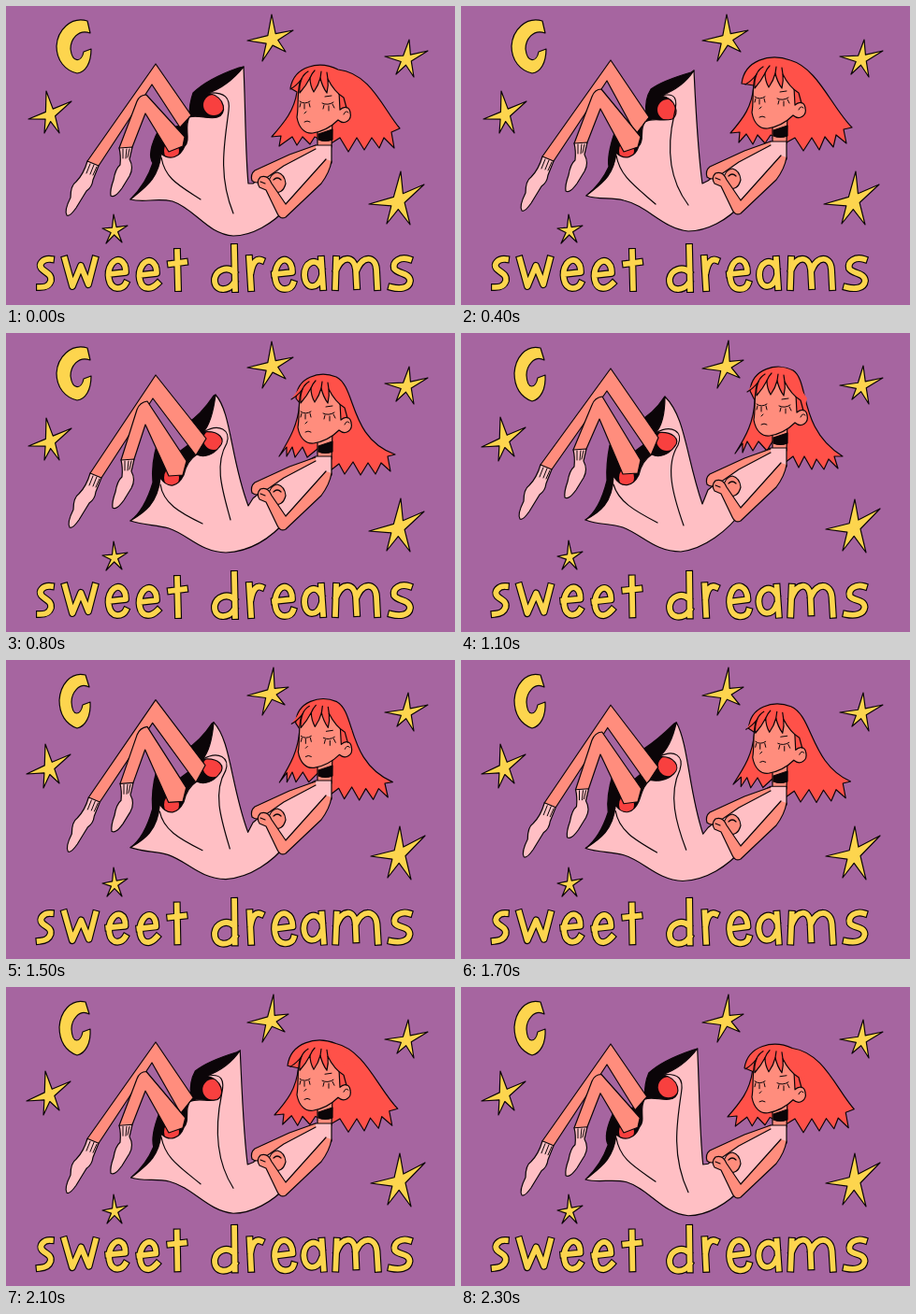
These frames come from a looping animation (480 px wide and 320 px high, 2.4 s). An HTML page with a canvas:

```html
<!DOCTYPE html>
<html lang="en">
<head>
<meta charset="utf-8">
<title>sweet dreams</title>
<style>
html, body { margin: 0; width: 100%; height: 100%; overflow: hidden; background: #a665a0; }
canvas { display: block; width: 480px; height: 320px; }
</style>
</head>
<body>
<canvas id="c" width="480" height="320" role="img" aria-label="sweet dreams"></canvas>
<script>
const ctx = document.getElementById('c').getContext('2d');
const INK = '#0b0508', BG = '#a665a0', YELLOW = '#fdd54e', SKIN = '#ff8d7d',
      HAIR = '#ff5149', PINK = '#ffbfc4', RED = '#f8403f';

// Pose keys, counted in steps of 100 ms from the lowest pose to the highest
const KEYS = [0, 4, 8, 11];
const STEP = 100, COUNT = 24;

const BOB = ['0 0', '0 -4', '0 -16', '0 -25'];
const FOOT_BACK_AT = ['0 0', '0 -5', '3 -16', '-2 -25'];
const FOOT_FRONT_AT = ['0 0', '0 -5', '2 -16', '-1 -27'];
const FACE = ['0 0', '0 -5', '1 -18', '2 -26'];

const LINING = [
  'M249,66Q215,78 200,93Q196,104 196,118L186,128L163,133Q150,158 157,168Q150,190 133,207L175,185L235,120L238,95L254,65Z',
  'M246,71Q215,80 203,89Q196,100 198,116L186,130L164,136Q156,160 158,172Q150,190 134,203L175,185L232,122L235,95L249,69Z',
  'M222,67Q208,88 193,97Q196,106 200,116L184,128L162,117Q155,140 157,160Q148,190 133,201L175,185L230,120L226,100L224,66Z',
  'M217,69Q206,86 189,95Q195,106 200,116L184,128L159,120Q155,140 156,158Q148,190 133,200L175,185L230,120L222,100L218,68Z'
];
const DRESS = [
  'M254,65C256,110 256,160 259,190L264,190L294,168L331,149L348,149L348,168L302,214C285,234 262,246 243,246C215,244 202,217 178,209C160,205 148,211 133,207C150,193 163,185 166,158C175,166 186,162 191,150C198,143 190,130 196,119C205,116 218,122 226,119C236,116 236,98 216,93C232,88 245,76 254,65Z',
  'M249,69C251,110 253,155 258,190L264,187L294,164L331,145L348,145L348,164L302,210C285,230 262,241 243,241C215,238 200,214 174,208C160,204 148,208 134,203C150,190 163,183 166,157C175,166 186,162 190,150C197,143 190,132 197,124C205,119 216,124 226,121C234,116 230,99 214,96C230,90 242,80 249,69Z',
  'M224,66C241,85 240,135 259,185L264,177L294,152L331,132L348,132L348,152L302,198C285,218 262,234 235,235C207,234 195,216 174,209C160,205 148,206 133,201C148,192 162,183 165,155C174,168 184,164 190,152C192,143 196,135 204,130C212,134 222,130 228,122C236,114 228,104 211,106C218,98 222,82 224,66Z',
  'M218,68C240,90 240,130 258,183L264,168L294,143L331,123L348,123L348,143L302,189C285,212 260,231 235,234C207,234 194,216 173,208C158,203 148,206 133,200C148,192 162,183 163,153C172,168 184,164 190,152C192,143 196,135 204,130C212,134 222,130 228,122C236,114 226,104 208,107C216,98 218,82 218,68Z'
];
const FOLDS = [
  'M216,93C234,92 240,98 238,112C234,145 226,180 243,222M166,162C170,185 185,192 208,207',
  'M214,96C230,92 232,100 228,116C220,150 222,185 243,213M166,160C170,182 185,192 208,212',
  'M211,106C228,96 241,104 236,118C222,142 232,170 240,200M165,162C168,182 185,192 210,204',
  'M208,107C226,97 238,106 232,120C218,142 226,172 238,206M163,162C168,180 185,190 210,203'
];
const LEG_BACK = [
  'M87,166L160,62L198,117L186,130L156,84L99,171',
  'M87,161L160,58L201,119L187,137L156,80L99,166',
  'M90,150L160,45L214,113L203,131L157,70L102,155',
  'M85,141L160,38L211,112L203,131L156,62L97,146'
];
const LEG_FRONT = [
  'M121,152L140,102Q143,95 150,95L191,140L189,150L174,156L149,115L135,151',
  'M121,147L140,97Q143,89 150,89L192,140L189,151L174,156L149,110L135,146',
  'M123,136L140,82Q143,74 151,73L193,137L189,152L174,153L149,98L137,135',
  'M120,125L140,77Q143,69 151,68L192,136L189,150L173,151L148,92L134,124'
];
const KNEE_HOLES = ['222 106', '221 111', '222 114', '220 115'];

const MANE = [
  'M304,88C308,64 335,58 355,68C390,72 403,110 421,131L412,135L415,152L404,141L399,152L391,141L383,154L375,141L366,156L357,141L346,148L330,140L325,148L317,140L311,149L306,140L292,150L294,139L284,140C298,124 308,112 311,92Z',
  'M300,83C303,58 330,50 352,58C381,66 396,108 418,130L409,132L412,147L401,138L398,151L389,140L383,154L375,141L366,155L357,141L348,146L331,138L325,147L317,138L312,148L305,137L297,146L298,135L288,136C302,120 311,108 313,85Z',
  'M310,70C311,47 335,40 353,47C375,58 366,112 416,130L408,132L411,148L401,139L395,151L387,139L379,152L371,138L362,151L356,140L347,147L333,124L322,133L317,122L309,133L306,122L300,132L300,122L292,132C304,112 312,98 314,75Z',
  'M309,62C311,38 338,31 355,40C373,52 360,102 408,132L399,132L403,145L393,135L388,146L380,135L375,146L367,132L361,144L355,132L346,139L333,116L327,126L318,116L312,126L306,116L301,128L301,118L293,129C305,110 313,95 314,72Z'
];

const FOOT_BACK = 'M87,166L99,171L93,186Q92,194 86,198L75,216Q68,226 65,224Q62,219 69,205Q69,192 75,188Q83,180 87,166Z';
const FOOT_FRONT = 'M121,152L135,151L132,164Q137,173 132,182L124,195Q116,206 112,203Q111,197 115,186Q117,174 122,170Q123,160 121,152Z';
const CUFFS_BACK = 'M90,169L86,179M94,170L90,180M97,172L93,181';
const CUFFS_FRONT = 'M125,153L125,163M129,153L128,163M132,153L130,162';
const ARM_FAR = 'M331,149L303,159L266,176Q261,180 263,187Q268,191 274,187L297,171L331,153';
const FIST = 'M280,191Q282,179 290,178Q298,180 299,190Q296,202 285,199ZM286,186Q290,182 294,186';
const ARM_NEAR = 'M342,164L299,212L284,190Q280,180 272,183Q267,188 271,194L278,197L290,222Q293,229 299,226L337,190Q346,178 348,166M272,188L277,190';
const HEAD = 'M314,82C311,96 313,108 311,119C313,131 320,137 328,136C340,134 349,128 355,122C362,128 370,122 368,114C367,107 361,107 357,111L356,92L340,72L322,72Z';
const FRINGE = 'M304,89Q311,85 316,78Q313,86 314,93Q321,85 325,77Q325,85 329,92Q334,85 336,77Q338,86 343,93Q345,85 344,78Q351,92 361,98L364,109';
const STRANDS = 'M316,78Q318,73 323,70M325,77Q327,72 330,69M336,77L337,70M344,78L343,71';
const FEATURES = 'M314,102Q319,106 325,102M338,104Q344,107 350,103M315,104L314,108M319,105L319,110M324,104L325,108M340,106L339,110M345,107L345,112M349,105L351,109M341,97L348,96M321,113L319,115M319,124Q322,122 325,124M361,116Q363,111 366,114';

const MOONS = [
  'M87,16L90,29C77,24 69,36 69,46C71,62 81,60 83,49L91,46C91,61 85,71 76,72C63,69 54,58 54,43C55,26 69,11 87,16Z',
  'M85,16L89,29C78,23 70,36 70,45C71,62 80,59 82,48L90,45C91,60 85,71 76,73C64,69 57,58 57,43C58,27 69,12 85,16Z'
];
// Five tips each, clockwise from the top
const STARS = [
  ['284 9 307 26 299 49 274 59 258 37', '431 36 451 48 436 76 417 73 405 54',
   '43 91 70 102 57 136 41 136 24 121', '422 177 447 191 432 234 407 233 388 212',
   '115 223 130 235 124 253 107 254 103 238'],
  ['286 8 302 29 298 48 274 59 258 38', '430 35 451 48 436 76 418 71 405 56',
   '42 90 69 101 57 132 40 137 22 122', '421 178 448 188 433 235 408 233 390 210',
   '115 222 130 234 124 253 108 253 103 239']
];
const LETTERS = [
  'M48,271C40,270 34,276 38,281C43,286 49,287 48,294C46,301 40,301 36,301',
  'M63,271L71,300L80,278L88,298L95,271',
  'M110,287L128,285C128,272 119,268 113,276C107,285 109,301 119,302C124,302 127,299 128,297',
  'M143,288L161,286C161,273 152,269 146,277C140,286 142,302 152,302C157,302 160,299 162,297',
  'M183,263L184,302M176,276L191,274',
  'M244,258L245,303M244,285C237,278 225,282 223,292C222,306 238,306 244,296',
  'M260,270L262,302M262,284C264,274 268,270 273,272',
  'M287,287L306,285C306,271 296,268 291,276C285,286 287,303 298,303C303,303 306,300 307,297',
  'M337,271L339,301M337,280C331,268 319,275 319,288C320,304 333,303 337,291',
  'M352,301L353,271M353,282C359,267 372,267 374,282L375,300M375,282C381,267 395,267 396,282L397,301',
  'M431,271C422,268 413,273 415,281C419,287 431,285 432,294C431,303 420,303 412,301'
];

const NUM = /-?\d+(\.\d+)?/g;
const nums = s => s.match(NUM).map(Number);

function tween(keys, d) {
  let i = 0;
  while (i < KEYS.length - 2 && d > KEYS[i + 1]) i++;
  const f = Math.min(1, (d - KEYS[i]) / (KEYS[i + 1] - KEYS[i]));
  const to = nums(keys[i + 1]);
  let n = 0;
  return keys[i].replace(NUM, a => (+a + (to[n++] - a) * f).toFixed(2));
}

function wobble(path, seed) {
  let n = seed * 17;
  return path.replace(NUM, a => (+a + Math.sin(++n * 12.9) * 0.7).toFixed(2));
}

function draw(path, fill, line = INK, width = 1.2) {
  const p = new Path2D(path);
  if (fill) { ctx.fillStyle = fill; ctx.fill(p); }
  if (line) { ctx.strokeStyle = line; ctx.lineWidth = width; ctx.stroke(p); }
}

function shifted(keys, d, paint) {
  ctx.save();
  ctx.translate(...nums(tween(keys, d)));
  paint();
  ctx.restore();
}

function hole(x, y, rx, ry) {
  ctx.beginPath();
  ctx.ellipse(x, y, rx, ry, 0, 0, Math.PI * 2);
  ctx.fillStyle = RED;
  ctx.fill();
}

function star(tips) {
  const v = nums(tips), pts = [];
  let cx = 0, cy = 0;
  for (let i = 0; i < 10; i += 2) { cx += v[i] / 5; cy += v[i + 1] / 5; }
  for (let i = 0; i < 10; i += 2) {
    const j = (i + 2) % 10, k = 0.34;
    const mx = (v[i] + v[j]) / 2, my = (v[i + 1] + v[j + 1]) / 2;
    pts.push([v[i], v[i + 1]], [cx + (mx - cx) * k, cy + (my - cy) * k]);
  }
  draw('M' + pts.join('L') + 'Z', YELLOW);
}

function sky(alt) {
  draw(MOONS[alt], YELLOW);
  STARS[alt].forEach(star);
  ctx.lineCap = 'square';
  LETTERS.forEach((s, i) => {
    const path = alt ? wobble(s, i + 1) : s;
    draw(path, null, INK, 8);
    draw(path, null, YELLOW, 5.7);
  });
  ctx.lineCap = 'round';
}

function girl(d) {
  draw(tween(MANE, d), HAIR);
  draw(tween(LINING, d), INK);
  hole(...nums(tween(KNEE_HOLES, d)), 11, 11);
  hole(177, 155, 8, 11);
  draw(tween(LEG_BACK, d), SKIN);
  draw(tween(LEG_FRONT, d), SKIN);
  shifted(FOOT_BACK_AT, d, () => {
    draw(FOOT_BACK, PINK);
    draw(CUFFS_BACK, null, INK, 1);
  });
  shifted(FOOT_FRONT_AT, d, () => {
    draw(FOOT_FRONT, PINK);
    draw(CUFFS_FRONT, null, INK, 1);
  });
  shifted(BOB, d, () => draw('M333,128L333,152L348,151L349,122Z', SKIN));
  draw(tween(DRESS, d), PINK);
  draw(tween(FOLDS, d), null);
  shifted(BOB, d, () => {
    draw('M334,137L349,132L349,143Q341,146 334,143Z', INK);
    draw(ARM_FAR, SKIN);
    draw(FIST, SKIN);
    draw(ARM_NEAR, SKIN);
  });
  shifted(FACE, d, () => {
    draw(HEAD, SKIN);
    draw(FRINGE + 'L368,96L352,72L330,69L316,72Z', HAIR, null);
    draw(FRINGE, null);
    draw(STRANDS, null);
    draw(FEATURES, null, INK, 1);
  });
}

function render(now) {
  const k = Math.floor(now / STEP) % COUNT;
  ctx.fillStyle = BG;
  ctx.fillRect(0, 0, 480, 320);
  ctx.lineJoin = ctx.lineCap = 'round';
  sky(k % 2);
  girl(Math.min(k, COUNT - k));
}

const start = performance.now();
function loop() {
  render(performance.now() - start);
  requestAnimationFrame(loop);
}
loop();
</script>
</body>
</html>
```
